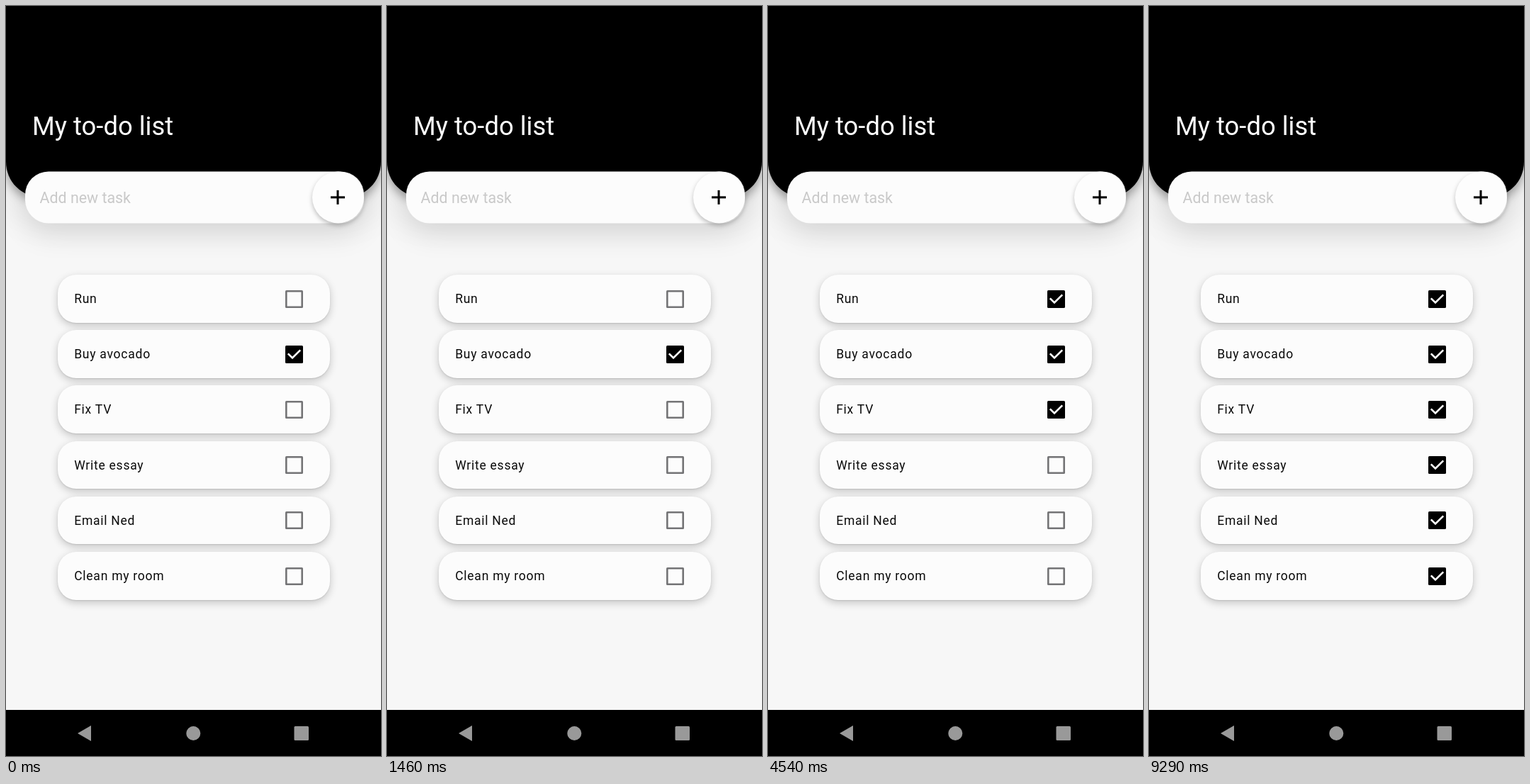
An HTML page for the animation above (9.33 s loop, 529 px wide and 1058 px high).

```html
<!DOCTYPE html>
<html lang="en">
<head>
<meta charset="utf-8">
<title>To-do list</title>
<style>
  /* Loop clock in ms; every checkbox derives its state from it. */
  @property --clock { syntax: "<number>"; inherits: true; initial-value: 0; }
  @keyframes tick { from { --clock: 0; } to { --clock: 9330; } }

  html, body { margin: 0; width: 100%; height: 100%; overflow: hidden; }
  .screen {
    position: relative; width: 529px; height: 1058px; overflow: hidden;
    background: #f7f7f7; color: #0a0a0a;
    font-family: Roboto, sans-serif; white-space: nowrap;
    animation: tick 9330ms linear infinite;
  }
  .header, .entry, .add, .row, .box, .nav { position: absolute; box-sizing: border-box; }

  .header {
    left: 0; top: 0; width: 529px; height: 270px;
    background: #000; border-radius: 0 0 50px 50px;
    box-shadow: 0 6px 14px rgba(0, 0, 0, .36), 0 24px 60px rgba(0, 0, 0, .08);
  }
  h1 {
    position: absolute; left: 37px; top: 150px; margin: 0;
    font-size: 36.4px; font-weight: 400; line-height: 40px; color: #fff;
  }
  .entry {
    left: 27px; top: 234px; width: 478px; height: 73px;
    padding: 1px 0 0 20.5px; border-radius: 33px; background: #fcfcfc;
    font-size: 21.4px; line-height: 73px; color: #c9c9c9;
    transform: translateY(-.6px);
    box-shadow: 0 14px 40px rgba(0, 0, 0, .12);
  }
  .add {
    right: 0; top: 0; width: 73px; height: 73px;
    border-radius: 50%; background: #fdfdfd;
    box-shadow: 0 3px 6px rgba(0, 0, 0, .25);
  }
  .add::before, .add::after {
    content: ""; position: absolute; left: 26px; top: 35px;
    width: 20px; height: 3px; background: #000;
  }
  .add::after { transform: rotate(90deg); }

  .row {
    left: 73px; top: calc(379px + 78.2px * var(--i));
    width: 383.5px; height: 67.5px; padding: 1px 0 0 23.2px;
    border-radius: 26px; background: #fcfcfc;
    font-size: 17.5px; line-height: 67.5px; letter-spacing: .75px;
    box-shadow: 0 4px 12px rgba(0, 0, 0, .2), 0 1px 2px rgba(0, 0, 0, .1);
  }
  /* First 100 ms fill the box, the next 100 ms draw the tick. */
  .box {
    --fill: clamp(0, (var(--clock) - var(--at)) / 100, 1);
    --draw: clamp(0, (var(--clock) - var(--at)) / 100 - 1, 1);
    left: 321px; top: 21.5px; width: 25px; height: 25px; border-radius: 1.6px;
    box-shadow: inset 0 0 0 calc(2.6px + 10px * var(--fill))
      color-mix(in srgb, #000 calc(100% * var(--fill)), #747476);
  }
  .box svg { position: absolute; left: 0; top: 0; }
  .box path {
    fill: none; stroke: #fff; stroke-width: 2.6;
    stroke-dasharray: 1 2; stroke-dashoffset: calc(1 - var(--draw));
    opacity: clamp(0, var(--draw) * 100, 1);
  }

  .nav { left: 0; top: 993px; width: 529px; height: 65px; background: #000; }
</style>
</head>
<body>
<main class="screen">
  <div class="header"><h1>My to-do list</h1></div>
  <div class="entry">Add new task<div class="add"></div></div>
  <div id="list"></div>
  <svg class="nav" viewBox="0 0 529 65" fill="#999">
    <path d="M101 33 L120 22 V44 Z"/>
    <circle cx="264.3" cy="33" r="10"/>
    <rect x="406.5" y="23" width="20.5" height="20" rx="1.5"/>
  </svg>
</main>
<script>
  // Label and the time (ms) at which it gets ticked; negative means ticked from the start.
  const tasks = [
    ["Run", 3000],
    ["Buy avocado", -1000],
    ["Fix TV", 4000],
    ["Write essay", 5100],
    ["Email Ned", 6150],
    ["Clean my room", 7050],
  ];
  document.getElementById("list").innerHTML = tasks.map(([label, at], i) => `
    <div class="row" style="--i:${i}">${label}
      <span class="box" style="--at:${at}">
        <svg width="25" height="25" viewBox="0 0 25 25">
          <path pathLength="1" d="M3.8 11.3 L10 17.5 L21.2 6.3"/>
        </svg>
      </span>
    </div>`).join("");
</script>
</body>
</html>
```
